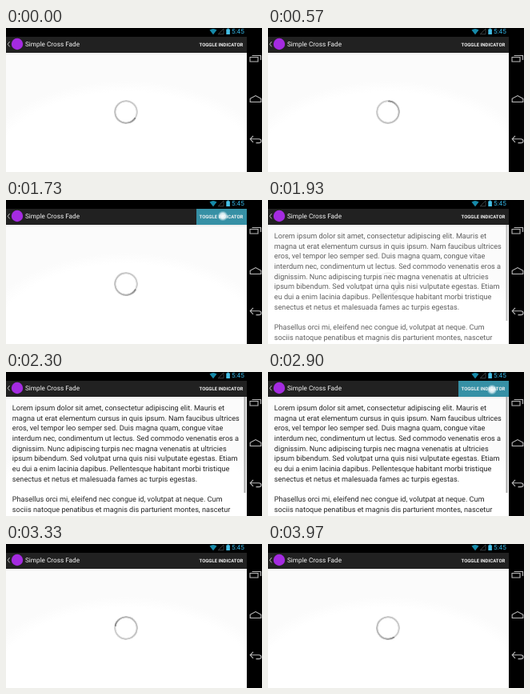
Animation, 320 px wide and 180 px high, one loop 4010 ms. Source, as an HTML page:

```html
<!DOCTYPE html>
<html lang="en">
<head>
<meta charset="utf-8">
<title>Simple Cross Fade</title>
<style>
html, body { margin: 0; width: 100%; height: 100%; overflow: hidden; background: #000; }
#stage { position: relative; width: 320px; height: 180px; overflow: hidden; }
#stage > * { position: absolute; left: 0; top: 0; }
#page {
  top: 31px; width: 301px; height: 149px;
  background: linear-gradient(#0001, #0000 3px),
    radial-gradient(ellipse 190px 115px at 150px 150px, #fff 88%, #fbfbfb);
}
#spinner {
  left: 135px; top: 90px; width: 30px; height: 30px; border-radius: 50%;
  background: conic-gradient(#8a8a8a, #b4b4b4 50deg, #c4c4c4 150deg, #d2d2d2);
  -webkit-mask: radial-gradient(circle, #0000 12.3px, #000 12.9px);
  mask: radial-gradient(circle, #0000 12.3px, #000 12.9px);
}
svg { display: block; }
text { font-family: Roboto, "Open Sans", sans-serif; text-rendering: geometricPrecision; }
#lines { font-size: 9.15px; font-kerning: none; fill: #262626; }
</style>
</head>
<body>
<div id="stage">
  <div id="page"></div>
  <div id="spinner"></div>
  <svg id="lines" width="301" height="180">
    <rect x="297.5" y="31" width="2" height="120" fill="#a8a8a8"/>
  </svg>
  <svg width="320" height="180" fill="none">
    <path d="M0 0H320V180H301V11H0z" fill="#000"/>
    <rect y="11" width="301" height="20" fill="#212121"/>
    <rect id="press" x="238" y="11" width="63" height="20" fill="#3690a5"/>
    <path d="M4.6 17L2.2 20.2L4.6 23.4" stroke="#bbb"/>
    <circle cx="14" cy="20" r="7.2" fill="#a42be0"/>
    <text x="24" y="23.3" font-size="8.2" fill="#f4f4f4">Simple Cross Fade</text>
    <text x="241.5" y="22.5" font-size="6" font-weight="700" fill="#f4f4f4">TOGGLE INDICATOR</text>
    <circle id="touch" r="6.5" fill="url(#glow)"/>

    <path d="M254.5 2.5Q259 -.5 263.5 2.5L259 8.2z" fill="#168aa9"/>
    <path d="M272 1V7.7H265.3z" stroke="#4f585b" stroke-width=".7"/>
    <path d="M275.3 1.4H276.7V.6H278.5V1.4H279.9V8H275.3z" fill="#45bfe6"/>
    <text x="282" y="7.4" font-size="8.2" fill="#33b5e5">5:45</text>

    <g stroke="#bcbcbc" stroke-width="1.1">
      <path d="M305 36.5H315V42H305z"/>
      <path d="M307.5 34.5H318.5V40"/>
      <path d="M305.2 92.5V88.3L312 84.6L318.8 88.3V92.5z"/>
      <path d="M309 134.8L305.2 138.8L309 142.8M305.2 138.8H316Q319 138.8 319 141.2T316 143.6H312.5"/>
    </g>
    <defs>
      <radialGradient id="glow">
        <stop offset="0" stop-color="#fff" stop-opacity=".95"/>
        <stop offset=".55" stop-color="#eaf6fa" stop-opacity=".85"/>
        <stop offset="1" stop-color="#cfeaf2" stop-opacity="0"/>
      </radialGradient>
    </defs>
  </svg>
</div>
<script>
const LOOP = 4010, FADE = 200, SPEED = 0.21;
const taps = [
  { down: 1660, up: 1800, x: 271, y: 20 },
  { down: 2830, up: 2960, x: 280, y: 22 }
];
const copy = [
  "Lorem ipsum dolor sit amet, consectetur adipiscing elit. Mauris et",
  "magna ut erat elementum cursus in quis ipsum. Nam faucibus ultrices",
  "eros, vel tempor leo semper sed. Duis magna quam, congue vitae",
  "interdum nec, condimentum ut lectus. Sed commodo venenatis eros a",
  "dignissim. Nunc adipiscing turpis nec magna venenatis at ultricies",
  "ipsum bibendum. Sed volutpat urna quis nisi vulputate egestas. Etiam",
  "eu dui a enim lacinia dapibus. Pellentesque habitant morbi tristique",
  "senectus et netus et malesuada fames ac turpis egestas.",
  "",
  "Phasellus orci mi, eleifend nec congue id, volutpat at neque. Cum",
  "sociis natoque penatibus et magnis dis parturient montes, nascetur"
];

const $ = id => document.getElementById(id);
const [lines, spinner, press, touch] = ["lines", "spinner", "press", "touch"].map($);
const clamp = v => Math.min(1, Math.max(0, v));
const ease = v => (1 - Math.cos(Math.PI * clamp(v))) / 2;

copy.forEach((line, i) => {
  const row = document.createElementNS("http://www.w3.org/2000/svg", "text");
  row.setAttribute("x", 7.8);
  row.setAttribute("y", 48 + i * 12.65);
  row.textContent = line;
  lines.append(row);
});

function draw(t) {
  const shown = ease((t - taps[0].up) / FADE) - ease((t - taps[1].up) / FADE);
  lines.style.opacity = shown;
  spinner.style.opacity = 1 - shown;

  // The spinner restarts with a new phase while hidden.
  const angle = t < 2500 ? 122 - SPEED * t : 146 - SPEED * (t - 3970);
  spinner.style.transform = `rotate(${angle}deg)`;

  const tap = taps.find(p => t >= p.down && t < p.up + 60);
  const glow = tap ? 1 - clamp((t - tap.up) / 60) : 0;
  press.style.opacity = touch.style.opacity = glow;
  if (tap) {
    touch.setAttribute("cx", tap.x);
    touch.setAttribute("cy", tap.y);
  }
}

const start = performance.now();
function tick() {
  draw((performance.now() - start) % LOOP);
  requestAnimationFrame(tick);
}
tick();
</script>
</body>
</html>
```
